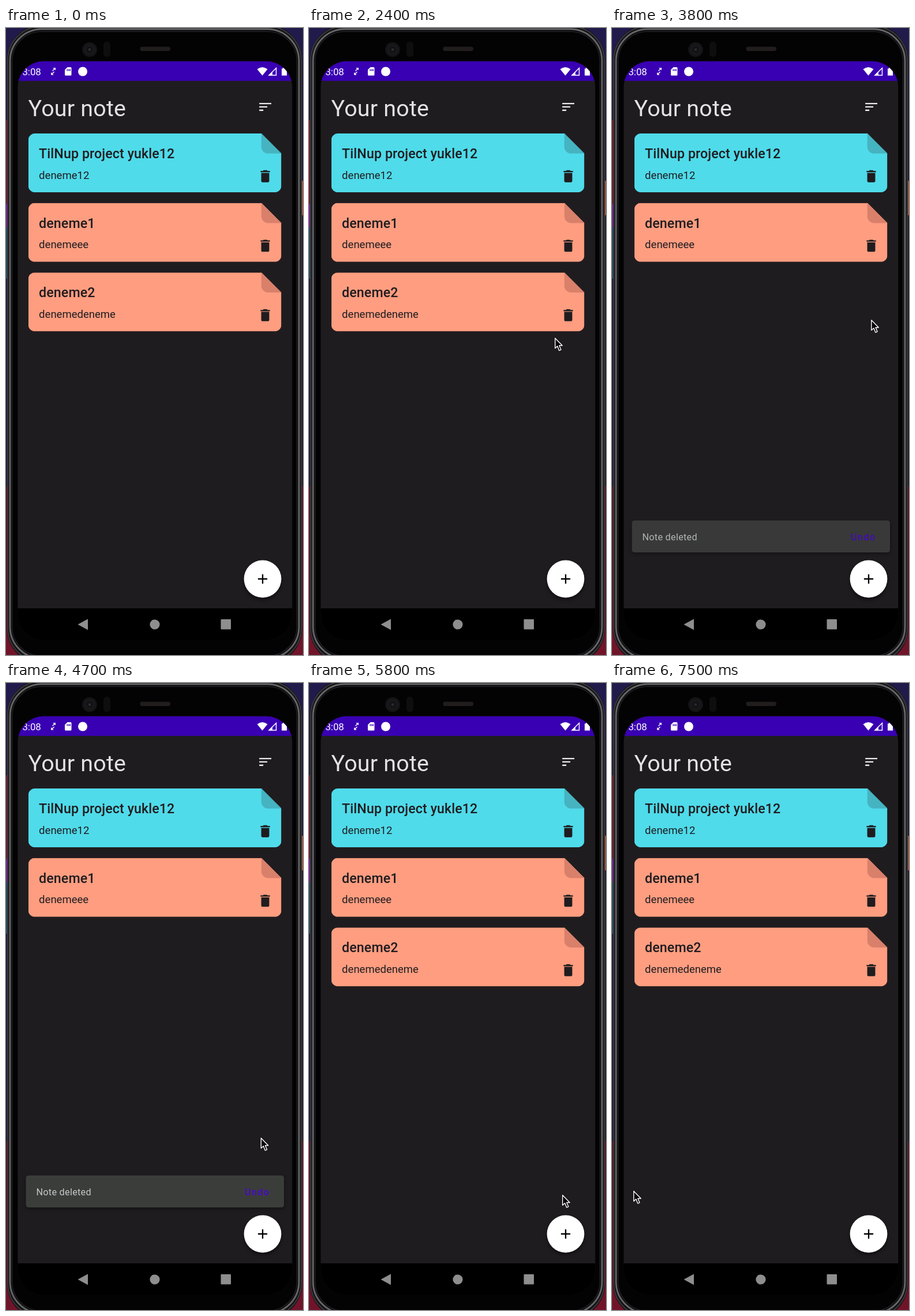
Write an HTML page that moves like this. It is 515 by 1088 pixels and loops after 7600 ms.

```html
<!DOCTYPE html>
<html lang="en">
<head>
<meta charset="utf-8">
<title>Notes</title>
<style>
html, body { margin: 0; width: 100%; height: 100%; overflow: hidden; background: #201b4b; }
svg { display: block; width: 515px; height: 1088px; font-family: Roboto, "Noto Sans", sans-serif; }
</style>
</head>
<body>
<svg viewBox="0 0 515 1088" xmlns="http://www.w3.org/2000/svg">
  <defs>
    <clipPath id="screen"><rect x="20.3" y="57.7" width="476" height="1004.5" rx="45"/></clipPath>
    <clipPath id="card"><path d="M11.6 0H404.2L439 34.8V90.6A11.6 11.6 0 0 1 427.4 102.2H11.6A11.6 11.6 0 0 1 0 90.6V11.6A11.6 11.6 0 0 1 11.6 0Z"/></clipPath>
    <path id="bin" d="M6 19c0 1.1.9 2 2 2h8c1.1 0 2-.9 2-2V7H6v12zM19 4h-3.5l-1-1h-5l-1 1H5v2h14V4z"/>
    <radialGradient id="lens"><stop offset="0" stop-color="#34343c"/><stop offset=".3" stop-color="#0e0e11"/><stop offset=".75" stop-color="#18181a"/><stop offset="1" stop-color="#0f0e10"/></radialGradient>
    <filter id="soft" x="-30%" y="-30%" width="160%" height="170%"><feGaussianBlur stdDeviation="3"/></filter>
  </defs>

  <g id="wall"></g>

  <!-- phone body -->
  <rect x="1.5" y="-6" width="512" height="1110" rx="62" fill="#121113"/>
  <rect x="3" y="-3" width="509" height="1103" rx="59" fill="none" stroke="#3b3a3c" stroke-width="2"/>
  <rect x="7" y="2" width="501" height="1092" rx="55" fill="#040304" stroke="#656466" stroke-width="3"/>
  <rect x="10.5" y="6" width="494" height="1084" rx="51" fill="none" stroke="#1d1c1e" stroke-width="2"/>
  <circle cx="145" cy="37.5" r="13" fill="url(#lens)"/>
  <circle cx="145" cy="37.5" r="6.5" fill="none" stroke="#232327"/>
  <rect x="169" y="24" width="12" height="26" rx="5" fill="#0f0e0f"/>
  <rect x="232.5" y="32.5" width="52.5" height="7.5" rx="3.7" fill="#211d1c"/>

  <g clip-path="url(#screen)">
    <rect x="20" y="57" width="477" height="1006" fill="#1f1c1f"/>
    <rect x="20" y="57" width="477" height="34.8" fill="#3900b3"/>
    <rect x="20" y="1007" width="477" height="56"/>

    <!-- status bar -->
    <g fill="#fff">
      <text x="28.4" y="81.5" font-size="16.8">3:08</text>
      <path d="M80.5 74.5L85 70M82 69.8H85.2V73M83.5 76L79 80.5M82 80.7H78.8V77.5" fill="none" stroke="#fff" stroke-width="1.4"/>
      <path fill-rule="evenodd" d="M106.5 68H112a1.5 1.5 0 0 1 1.5 1.5V81a1.5 1.5 0 0 1-1.5 1.5H103.5a1.5 1.5 0 0 1-1.5-1.5V72.5ZM105.5 71.5V74.5H107V71.5ZM108 71.5V74.5H109.5V71.5ZM110.5 71.5V74.5H112V71.5Z"/>
      <circle cx="133" cy="75.5" r="8"/>
      <path d="M444.5 82.5L435.5 71.5Q444.5 64.5 453.5 71.5Z"/>
      <path d="M456 82H468.5V69.500Z" fill="none" stroke="#fff" stroke-width="1.5"/>
      <path d="M455.5 82H462V75.5Z"/>
      <path d="M478 70.5H480V69H487V82.5H478Z"/>
    </g>

    <text x="38.6" y="153" font-size="39.4" letter-spacing=".2" fill="#e4e2e4">Your note</text>
    <path transform="translate(435.7 123) scale(1.16)" fill="#ebe9eb" d="M3 18h6v-2H3v2zM3 6v2h18V6H3zm0 7h12v-2H3v2z"/>

    <g id="cards"></g>

    <g id="bar">
      <rect x="34.5" y="857" width="447.5" height="55" rx="4.6" opacity=".45" filter="url(#soft)"/>
      <rect x="34.5" y="854.5" width="447.5" height="55.5" rx="4.6" fill="#3b3d3b"/>
      <rect id="press" x="399" y="862" width="74" height="41" rx="4.6" fill="#48474b"/>
      <text x="52.5" y="889" font-size="16.2" letter-spacing=".29" fill="#c4c8c8">Note deleted</text>
      <text x="414" y="889" font-size="16.2" letter-spacing="1.45" font-weight="500" fill="#4808cc">Undo</text>
    </g>

    <circle cx="445" cy="960" r="32" opacity=".5" filter="url(#soft)"/>
    <circle cx="445" cy="956" r="32.4" fill="#fff"/>
    <path transform="translate(431.1 942.1) scale(1.16)" d="M19 13h-6v6h-2v-6H5v-2h6V5h2v6h6v2z"/>

    <!-- navigation -->
    <g fill="#8e8e8e">
      <path d="M124.5 1035L142 1025.5V1044.5Z"/>
      <circle cx="258" cy="1035" r="8.6"/>
      <rect x="372.5" y="1026" width="17.5" height="17.5" rx="1"/>
    </g>
  </g>

  <path id="cursor" d="M0 0V17.5L4 13.8L7 21.4L10.2 20L7.1 12.8H12.4Z" fill="#000" stroke="#fff" stroke-width="1.4" stroke-linejoin="round"/>
</svg>
<script>
const LOOP = 7600, STEP = 100;
const get = id => document.getElementById(id);

// Desktop slivers around the phone: x, y, width, height, colour
const wall = [
  [0, 0, 515, 160, '#201b4b'], [0, 160, 60, 145, '#941b30'],
  [0, 305, 60, 40, '#9a24c8'], [0, 345, 60, 90, '#286180'],
  [0, 435, 60, 360, '#221c50'], [0, 795, 515, 293, '#70142a'],
  [455, 160, 60, 105, '#211a47'], [455, 265, 60, 60, '#c9664a'],
  [455, 325, 60, 470, '#252034']
];
get('wall').innerHTML = wall.map(([x, y, w, h, c]) =>
  `<rect x="${x}" y="${y}" width="${w}" height="${h}" fill="${c}"/>`).join('');

const notes = [
  ['TilNup project yukle12', 'deneme12', '#4fdbea', '#46b3c1'],
  ['deneme1', 'denemeee', '#ff9d80', '#d9806b'],
  ['deneme2', 'denemedeneme', '#ff9d80', '#d9806b']
];
get('cards').innerHTML = notes.map(([title, body, fill, fold], i) => `
  <g id="note${i}" transform="translate(38.6 ${183 + i * 120.6})" fill="#1f1c1f">
    <g clip-path="url(#card)">
      <rect width="439" height="102.2" fill="${fill}"/>
      <rect x="404.2" y="-100" width="135" height="134.8" rx="11.6" fill="${fold}"/>
    </g>
    <text x="18.5" y="43" font-size="23.2" font-weight="500" letter-spacing=".1">${title}</text>
    <text x="18.5" y="78.8" font-size="18.55">${body}</text>
    <use href="#bin" transform="translate(397 60.3) scale(1.16)"/>
  </g>`).join('');

// Pointer stops: time, x, y
const stops = [
  [300, -20, 900], [1400, 360.7, 627.9], [1600, 360.7, 627.9], [2800, 449.9, 506.9],
  [3900, 449.9, 506.9], [5100, 439.7, 888.7], [6000, 439.7, 888.7], [7200, 37.7, 881.7]
];
const clamp = v => Math.min(1, Math.max(0, v));
const ease = u => u * u * (3 - 2 * u);

function pointer(t) {
  let i = 0;
  while (i < stops.length - 2 && t >= stops[i + 1][0]) i++;
  const [t0, x0, y0] = stops[i], [t1, x1, y1] = stops[i + 1];
  const u = ease(clamp((t - t0) / (t1 - t0)));
  return [x0 + (x1 - x0) * u, y0 + (y1 - y0) * u];
}

const show = (id, on) => get(id).setAttribute('visibility', on ? 'visible' : 'hidden');

function draw(t) {
  const deleted = t >= 3700 && t < 5800;
  const fade = ease(clamp((t - 3680) / 150));
  const size = 0.8 + 0.2 * clamp((t - 3680) / 120);
  show('note2', !deleted);
  show('bar', deleted);
  show('press', deleted && t >= 5700);
  get('bar').setAttribute('opacity', fade);
  get('bar').setAttribute('transform',
    `translate(258.25 882.25) scale(${size}) translate(-258.25 -882.25)`);
  get('cursor').setAttribute('transform', `translate(${pointer(t)})`);
}

function tick(now) {
  draw(Math.floor(now % LOOP / STEP) * STEP);
  requestAnimationFrame(tick);
}
draw(0);
requestAnimationFrame(tick);
</script>
</body>
</html>
```
